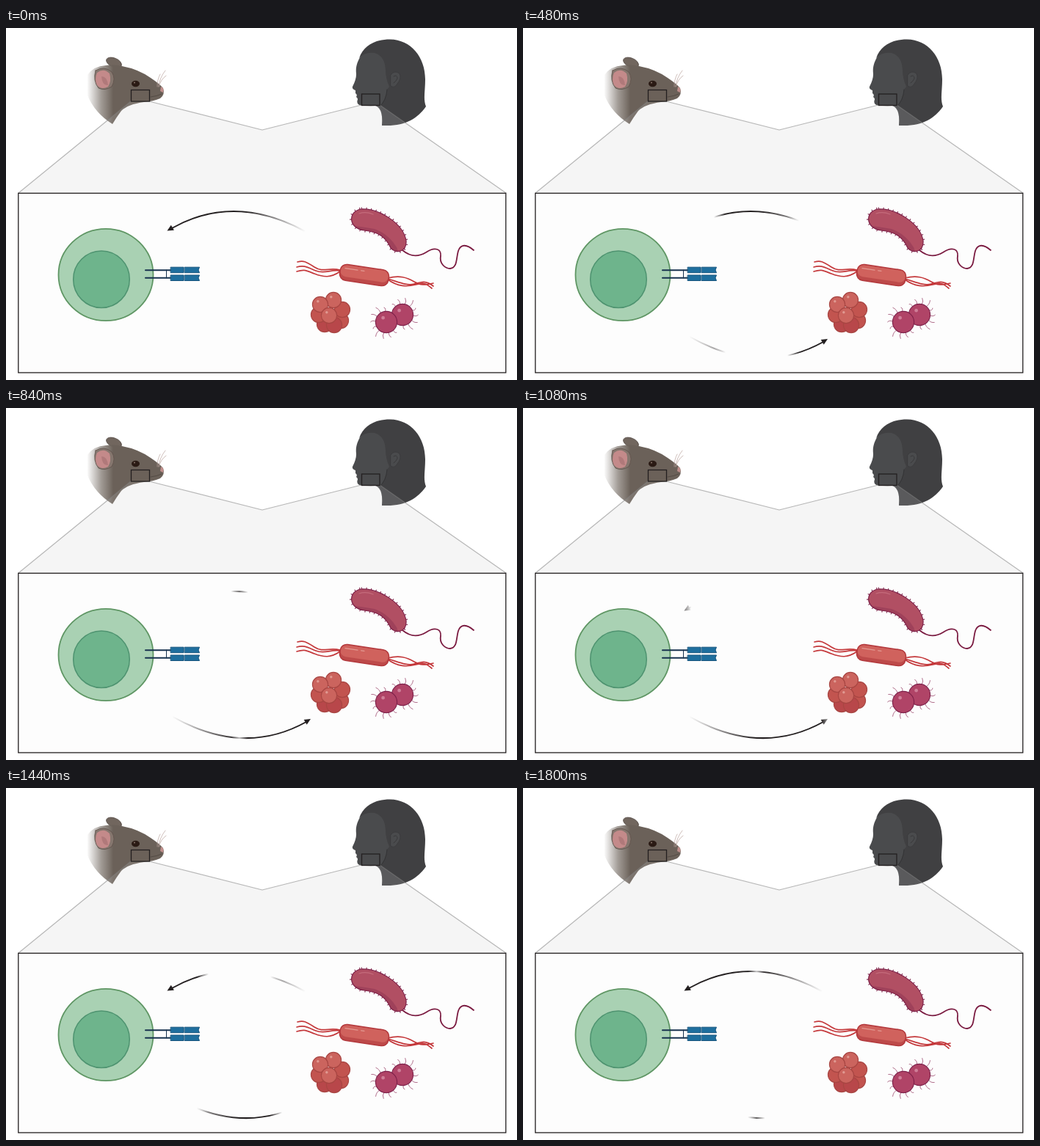
These frames come from a looping animation (696x480 px, 1860 ms). An HTML page:

```html
<!DOCTYPE html>
<html lang="en">
<head>
<meta charset="utf-8">
<title>Cell and microbe exchange</title>
<style>
  html, body { margin: 0; width: 100%; height: 100%; overflow: hidden; background: #fff; }
  svg { display: block; width: 696px; height: 480px; }
</style>
</head>
<body>
<svg viewBox="0 0 696 480" fill="none" stroke-linecap="round" stroke-linejoin="round">
  <defs>
    <linearGradient id="fur" gradientUnits="userSpaceOnUse" x1="110" y1="0" x2="146" y2="0">
      <stop stop-color="#7b726b" stop-opacity="0"/>
      <stop offset=".55" stop-color="#786f67" stop-opacity=".7"/>
      <stop offset="1" stop-color="#6b6159"/>
    </linearGradient>
    <linearGradient id="inkTop" gradientUnits="userSpaceOnUse" x1="408" y1="0" x2="325" y2="0">
      <stop stop-color="#231f20" stop-opacity="0"/>
      <stop offset="1" stop-color="#231f20"/>
    </linearGradient>
    <linearGradient id="inkLow" gradientUnits="userSpaceOnUse" x1="226" y1="0" x2="315" y2="0">
      <stop stop-color="#231f20" stop-opacity="0"/>
      <stop offset="1" stop-color="#231f20"/>
    </linearGradient>
    <linearGradient id="outerFade" gradientUnits="userSpaceOnUse" x1="0" y1="0" x2="696" y2="0"></linearGradient>
    <linearGradient id="innerFade" gradientUnits="userSpaceOnUse" x1="0" y1="0" x2="696" y2="0"></linearGradient>
    <mask id="outer" maskUnits="userSpaceOnUse" x="0" y="0" width="696" height="480">
      <rect width="696" height="480" fill="url(#outerFade)"/>
    </mask>
    <mask id="inner" maskUnits="userSpaceOnUse" x="0" y="0" width="696" height="480">
      <rect width="696" height="480" fill="url(#innerFade)"/>
    </mask>
    <path id="vibrio" d="M484 247C508 246 541 266 545 290C546 306 531 308 524 300C517 284 506 278 488 276C465 273 466 249 484 247Z"/>
    <clipPath id="vibrioClip"><use href="#vibrio"/></clipPath>
  </defs>

  <!-- mouse -->
  <ellipse cx="147" cy="47" rx="11" ry="6" transform="rotate(22 147 47)" fill="#71665e" stroke="#574d47" stroke-width=".8"/>
  <path fill="url(#fur)" d="M111 64Q119 52 136 51Q147 49 158 52Q180 56 197 68Q209 76 214 82Q217 91 210 96Q201 100 188 101Q166 104 157 113Q151 121 145 131Q121 116 111 92Z"/>
  <path d="M122 58Q134 51 144 60Q150 69 144 80Q135 86 126 82Q118 72 122 58Z" fill="#85766e" stroke="#5f514b" stroke-width=".8"/>
  <path d="M124 61Q133 54 141 62Q144 72 139 80Q130 85 124 78Q120 70 124 61Z" fill="#c48a8a"/>
  <path d="M130 66Q138 66 139 78Q131 79 130 66Z" fill="#b0797a"/>
  <ellipse cx="176.500" cy="76" rx="5.500" ry="4.200" fill="#2a1a14"/>
  <circle cx="175" cy="74.500" r="1" fill="#8b776c"/>
  <path d="M211 80Q216 82 214 88L210 86Z" fill="#c08f8c"/>
  <path d="M208 80Q209 68 217 58M208 80Q211 70 218 65M206 80Q206 70 210 63" stroke="#b9a39d" stroke-width=".7"/>
  <path d="M197 94Q206 93 212 90" stroke="#4d443e" stroke-width=".8"/>

  <!-- head -->
  <path fill="#4a4b4d" d="M484 37C478 46 476 54 477 62Q477.500 69 472 80Q471 83 476 85L476 89Q479 91 477 94Q480 96 478.500 99Q477.500 104 483 105.500Q493 106.500 503 106Q514 110 512 133L545 128L545 40Q515 12 484 37Z"/>
  <path fill="#404042" d="M481 41C487 24 503 15.500 523 15.500C552 16 571 40 571 70C571 86 568 97 572 107C561 123 545 133 519 133L512 133C514 122 512 112 508 108Q517 99 519 84L522 80Q517 69 517 57Q516 38 502 34Q489 32 481 41Z"/>
  <path d="M524 64Q529 57 536 62Q539 69 533 76Q529 83 524 79Z" fill="#4a4b4d" stroke="#39393b" stroke-width=".8"/>
  <path d="M528 66Q533 63 533 69Q531 73 528 75" stroke="#39393b"/>
  <path d="M519 84Q518 99 509 107" stroke="#303032" stroke-width=".8"/>

  <!-- callout -->
  <path d="M17 225L170 100H195L349 139L484 105H509L681 225Z" fill="#c8c8c8" fill-opacity=".19"/>
  <path d="M17 225L170 100M195 100L349 139L484 105M509 105L681 225" stroke="#808080" stroke-opacity=".55" stroke-width="1.200"/>
  <g stroke="#231f20" stroke-width="1.300" stroke-linejoin="miter">
    <rect x="170.500" y="84.500" width="25" height="15.500"/>
    <rect x="484.500" y="90" width="24.500" height="15.500"/>
    <rect x="16.800" y="225.300" width="664" height="244.700" fill="#fdfdfd"/>
  </g>

  <!-- cell and receptor -->
  <ellipse cx="136" cy="336.500" rx="64.500" ry="62.700" fill="#a9d1b3" stroke="#5f9664" stroke-width="1.800"/>
  <ellipse cx="130" cy="342.700" rx="38.300" ry="38.800" fill="#6eb48c" stroke="#4e9370" stroke-width="1.500"/>
  <path d="M190 330.300H225M190 340.700H225" stroke="#17324f" stroke-width="2"/>
  <path d="M218.500 330V341" stroke="#17324f"/>
  <g fill="#1f6f9e" stroke="#12527c" stroke-width="1">
    <path id="domain" d="M224.500 326.200H242V333.700H224.500ZM243.500 326.200H263.500L262 330L263.500 333.700H243.500Z"/>
    <use href="#domain" y="10.800"/>
  </g>

  <!-- curved bacterium -->
  <path d="M540 303C552 313 562 312 572 306C584 298 593 301 592 311C590 321 598 328 605 328C615 327 613 314 616 304C619 295 627 294 637 303" stroke="#7a1a40" stroke-width="1.800"/>
  <use href="#vibrio" stroke="#7a1f45" stroke-width="5" stroke-dasharray="1 5.500" stroke-linecap="butt"/>
  <use href="#vibrio" fill="#b14f63"/>
  <path d="M468 269Q486 271 502 274Q521 281 532 299L536 310L515 300L490 285Z" fill="#9f415a" clip-path="url(#vibrioClip)"/>
  <path d="M481 253Q490 250 500 254" stroke="#c56c7c" stroke-width="1.300"/>
  <use href="#vibrio" stroke="#7d1f47" stroke-width="1.200"/>

  <!-- rod -->
  <g stroke="#c4383b" stroke-width="1.700">
    <path d="M455 330C440 326 432 334 420 326S405 317 397 319M455 331C441 329 434 336 422 331S406 323 396 326M455 332C442 341 433 340 420 335S406 329 396 332"/>
    <path d="M520 341C536 337 546 340 556 346S572 350 582 348M520 342C534 346 546 352 556 349S572 344 582 352M520 343C534 353 546 353 558 350S572 348 580 355"/>
  </g>
  <g transform="rotate(8.500 488 337)">
    <rect x="454.500" y="326" width="67" height="22" rx="9" fill="#bd4a4a"/>
    <rect x="455" y="326.500" width="66" height="16.500" rx="8" fill="#d0625d"/>
    <path d="M461 331.500H478M483 331.500H487" stroke="#e39a93" stroke-width="1.400"/>
    <rect x="454.500" y="326" width="67" height="22" rx="9" stroke="#b3383c" stroke-width="1.500"/>
  </g>

  <g id="cocci"></g>

  <!-- exchange arrows -->
  <g id="topArrow">
    <path d="M226 273Q311 225 407 277" stroke="url(#inkTop)" stroke-width="2" stroke-linecap="butt"/>
    <path d="M219.500 276.500L224.800 268.700L228.900 275.700Z" fill="#231f20"/>
  </g>
  <g id="lowArrow">
    <path d="M227 421Q324 475.500 409 428" stroke="url(#inkLow)" stroke-width="2" stroke-linecap="butt"/>
    <path d="M415 424L405.700 425L409.700 431.800Z" fill="#231f20"/>
  </g>
</svg>
<script>
const NS = "http://www.w3.org/2000/svg";
const byId = id => document.getElementById(id);
function add(parent, tag, attrs) {
  const el = document.createElementNS(NS, tag);
  for (const k in attrs) el.setAttribute(k, attrs[k]);
  return parent.appendChild(el);
}

const cocci = byId("cocci");
function ball(x, y, r, fill, stroke, shine) {
  add(cocci, "circle", { cx: x, cy: y, r, fill, stroke, "stroke-width": 1.1 });
  if (shine) add(cocci, "circle", { cx: x - r * .3, cy: y - r * .4, r: r * .16, fill: shine });
}
const dark = "#b8474a", light = "#cb645e";
[[434, 404, dark], [456, 399, "#c2544f"], [447, 405, dark], [426, 391, "#c2544f"], [458, 384, "#c2544f"],
 [446, 371, light], [428, 377, light], [440, 392, light]]
  .forEach(([x, y, c]) => ball(x, y, 10.6, c, "#a84643", c === light && "#e09a92"));

// Hairs fan out from the free side of each ball of the pair.
function hairs(x, y, middle) {
  for (let i = 0; i < 9; i++) {
    const a = middle + (i - 4) * .47, len = 20 + (i * 5 % 4) * 1.4;
    const at = (r, turn) => `${x + r * Math.cos(a + turn)} ${y + r * Math.sin(a + turn)}`;
    add(cocci, "path", { d: `M${at(14, 0)}Q${at(19, .12)} ${at(len, -.04)}`, stroke: "#9c4a6e", "stroke-width": .8 });
  }
}
hairs(518, 401, 2.72);
hairs(540, 391, -.42);
ball(540, 391, 14.6, "#b04467", "#7d2049", "#cf7f98");
ball(518, 401, 14.6, "#b04467", "#7d2049", "#cf7f98");

// Each half of the loop swaps the arrows with a soft split closing on MID.
const LOOP = 1860, HALF = 960, STEP = 60, MID = 318, SOFT = 8;
const makeStops = id => [0, 1, 2, 3].map(() => add(byId(id), "stop", { "stop-color": "#fff" }));
const outerStops = makeStops("outerFade"), innerStops = makeStops("innerFade");

function draw(time) {
  const t = Math.floor(time % LOOP / STEP) * STEP;
  const phase = t % HALF;
  const edge = phase < 900 ? 206 + phase * .129 : 330;
  const near = Math.min(edge + SOFT, MID);
  const mix = Math.min(1, (edge + SOFT - near) / (2 * SOFT));
  const xs = [edge - SOFT, near, 2 * MID - near, 2 * MID - edge + SOFT];
  [1, mix, mix, 1].forEach((a, i) => {
    for (const [stops, alpha] of [[outerStops, a], [innerStops, 1 - a]]) {
      stops[i].setAttribute("offset", xs[i] / 696);
      stops[i].setAttribute("stop-opacity", alpha);
    }
  });
  const leaving = t < HALF ? "topArrow" : "lowArrow";
  for (const id of ["topArrow", "lowArrow"])
    byId(id).setAttribute("mask", id === leaving ? "url(#inner)" : "url(#outer)");
}

const start = performance.now();
function tick() {
  draw(performance.now() - start);
  requestAnimationFrame(tick);
}
tick();
</script>
</body>
</html>
```
